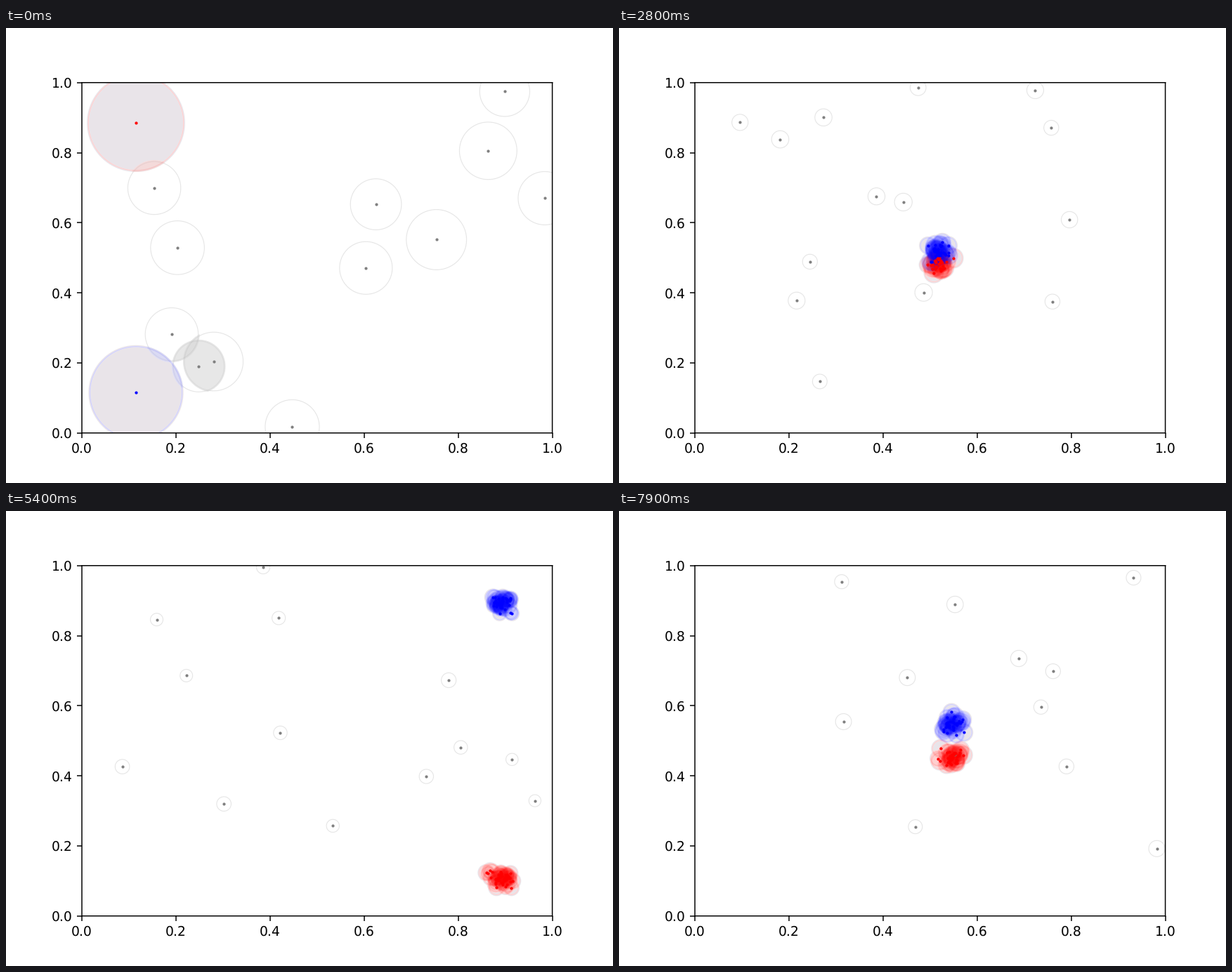
Recreate the animation shown at these times as a matplotlib script. Size 864x648 px, loop 8000 ms.

```python
import numpy as np
import matplotlib.pyplot as plt
from matplotlib.animation import FuncAnimation

FRAMES, STEP_MS, DPI = 80, 100, 135
LEFT, BOTTOM, WIDTH, HEIGHT = 108.0, 576.72, 669.6, 498.96  # axes box, px
X0, Y0, COLS, ROWS = 107, 77, 672, 500                      # painted area, px
HALF_EDGE = 1.4
ALPHA = 0.1
SPREAD = 0.0118
WHITE = np.array([255.0, 255.0, 255.0])
WASH = np.array([233.0, 228.0, 233.0])
INK = np.array([[128, 128, 128], [255, 0, 0], [0, 0, 255]], float)
DOTS = ["gray", "red", "blue"]
CLUTTER, RED, BLUE = range(3)

# Detections per track rise and fall over time.
COUNT_T = [0, 12, 21, 35, 47, 60, 79]
COUNT_N = [1, 34, 57, 6, 47, 44, 36]


def to_px(p):
    return np.column_stack([LEFT + p[:, 0] * WIDTH, BOTTOM - p[:, 1] * HEIGHT])


def to_data(p):
    return np.column_stack([(p[:, 0] - LEFT) / WIDTH, (BOTTOM - p[:, 1]) / HEIGHT])


def track(k):
    """Position along the diagonal, turning round at 0.9."""
    return 0.9 - abs(0.785 - 0.0144 * k)


def scan(k):
    """Clutter, red and blue circles of one step as (x, y, radius) in px."""
    rng = np.random.default_rng(1000 + k)
    n = int(round(np.interp(k, COUNT_T, COUNT_N)))
    u = track(k)

    def circles(points, weight):
        r = 62 / np.sqrt(weight) * rng.uniform(1, 1.23, len(points))
        return np.column_stack([to_px(points), r])

    def cluster(x, y):
        noise = rng.normal(0, SPREAD, (n, 2))
        return circles(noise - noise.mean(axis=0) + (x, y), n)

    clutter = circles(rng.random((rng.integers(12, 16), 2)), max(n, 3))
    return clutter, cluster(u, 1 - u), cluster(u, u)


def stamp(layers, x, y, r):
    """Add one outlined disc to a map of overlapping layers."""
    x, y, reach = x - X0, y - Y0, r + 3
    c0, c1 = max(0, int(x - reach)), min(COLS, int(x + reach) + 1)
    r0, r1 = max(0, int(y - reach)), min(ROWS, int(y + reach) + 1)
    d = np.hypot(np.arange(c0, c1)[None, :] + 0.5 - x,
                 np.arange(r0, r1)[:, None] + 0.5 - y)

    def cover(q):
        return np.clip(q - d + 0.5, 0, 1)

    layers[r0:r1, c0:c1] += cover(r) + cover(r + HALF_EDGE) - cover(r - HALF_EDGE)


def paint(groups):
    maps = np.zeros((3, ROWS, COLS))
    for layers, group in zip(maps, groups):
        for x, y, r in group:
            stamp(layers, x, y, r)
    hit = maps.sum(axis=0) > 0
    depth = maps[:, hit][..., None]
    pix = np.broadcast_to(WHITE, (depth.shape[1], 3))
    for layer, ink in zip(depth, INK):
        pix = ink + (pix - ink) * (1 - ALPHA) ** layer
    # A single layer shows as a neutral wash; colour starts at the second.
    wash = WHITE + (WASH - WHITE) * np.clip(depth[RED] + depth[BLUE], 0, 1)
    single = np.clip(2 - depth.sum(axis=0), 0, 1)
    img = np.full((ROWS, COLS, 3), 255, np.uint8)
    img[hit] = np.clip(pix * (1 - single) + wash * single, 0, 255).round()
    return img


plt.rcParams["text.hinting"] = "none"
fig, ax = plt.subplots(figsize=(6.4, 4.8), dpi=DPI)
corners = to_data(np.array([[X0, Y0 + ROWS], [X0 + COLS, Y0]], float))
blank = np.full((ROWS, COLS, 3), 255, np.uint8)
canvas = ax.imshow(blank, extent=corners.T.ravel(), aspect="auto",
                   interpolation="nearest", zorder=0)
dots = [ax.scatter([], [], s=5, c=c, linewidths=0, zorder=2) for c in DOTS]
ax.set_xlim(0, 1)
ax.set_ylim(0, 1)
for line in [*ax.spines.values(), *ax.get_xticklines(), *ax.get_yticklines()]:
    line.set_snap(False)


def draw(k):
    groups = scan(k)
    canvas.set_data(paint(groups))
    for dot, group in zip(dots, groups):
        dot.set_offsets(to_data(group))
    return [canvas, *dots]


anim = FuncAnimation(fig, draw, frames=FRAMES, interval=STEP_MS,
                     repeat=True, repeat_delay=0, blit=False)
plt.show()
```
